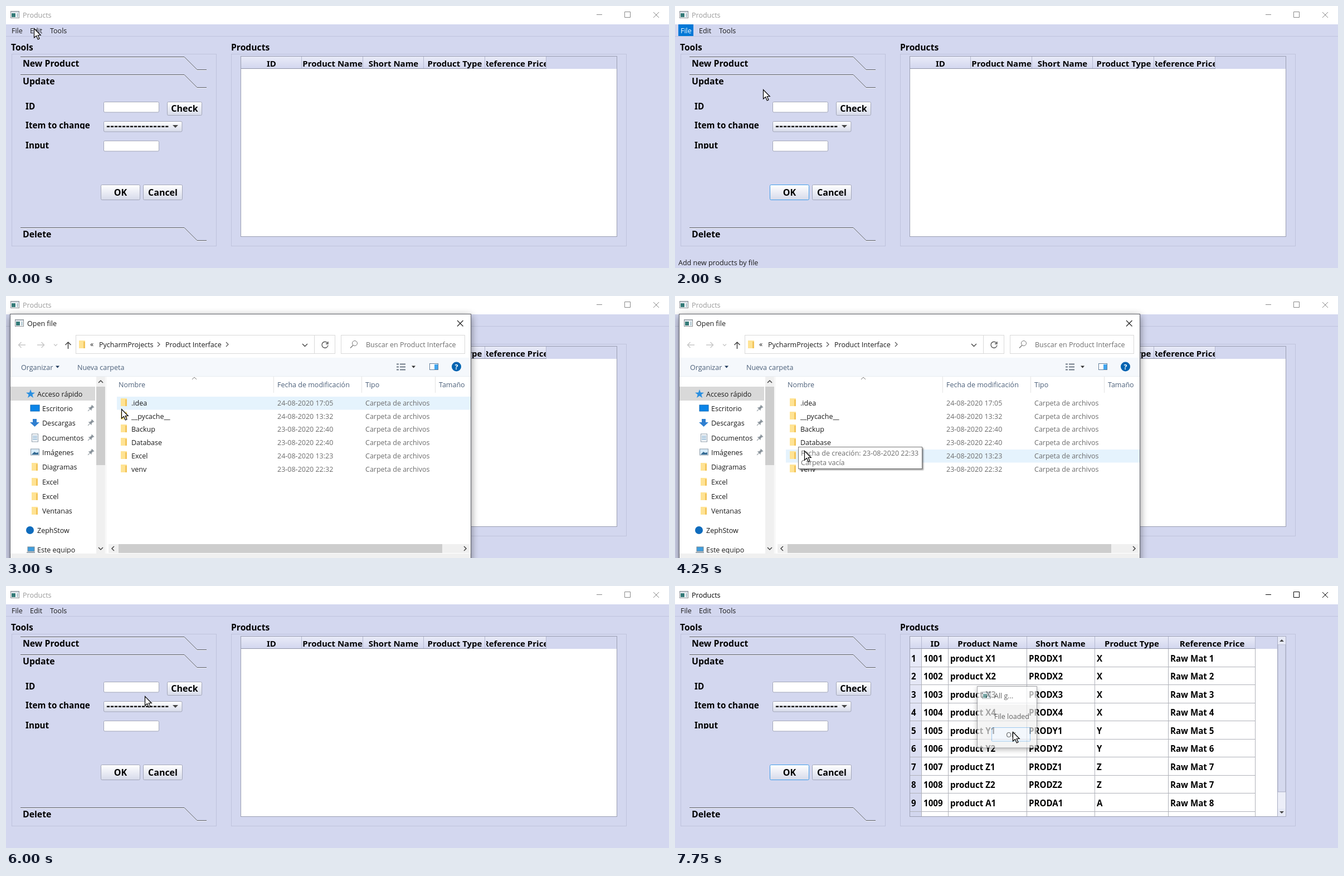
Recreate the animation shown at these times as an HTML page. Size 1190 by 471 pixels, loop 8000 ms.

```html
<!DOCTYPE html>
<html lang="en">
<head>
<meta charset="utf-8">
<title>Products</title>
<style>
html, body { margin: 0; width: 100%; height: 100%; overflow: hidden; background: #d3d7ef; }
svg { display: block; }
text { font: 12.5px "Open Sans", sans-serif; fill: #1a1a1a; white-space: pre; }
.b { font-family: "Noto Sans", sans-serif; font-weight: 700; fill: #000; }
.dash { font: 700 16.9px "DejaVu Sans", sans-serif; }
.mid { text-anchor: middle; }
.grey { fill: #6d6d6d; }
.head { fill: #4c607a; }
.line { fill: none; stroke: #444; }
.title text { fill: #999; }
.title path { fill: none; stroke: #888; }
.title.on text { fill: #000; }
.title.on path { stroke: #000; }
#okButton.on { stroke: #3f9be8; }
#fileMenu.on rect { fill: #0078d7; }
#fileMenu.on text { fill: #fff; }
#dialog { filter: drop-shadow(0 4px 7px #0007); }
#message { filter: drop-shadow(0 3px 5px #0006); }
#tip rect { filter: drop-shadow(2px 2px 1px #0006); }
</style>
</head>
<body>
<svg id="stage" width="1190" height="471" viewBox="0 0 1190 471"></svg>
<script>
const rect = (x, y, w, h, fill, stroke = 'none', more = '') =>
  `<rect x="${x}" y="${y}" width="${w}" height="${h}" fill="${fill}" stroke="${stroke}" ${more}/>`;
const text = (x, y, s, cls = '', size = 12.5) =>
  `<text x="${x}" y="${y}" class="${cls}" style="font-size:${size}px">${s}</text>`;
const bold = (x, y, s, size = 15.2, cls = '') => text(x, y, s, 'b ' + cls, size);
const line = (d, stroke = '#444', width = 1) =>
  `<path class="line" d="${d}" style="stroke:${stroke};stroke-width:${width}"/>`;
const shape = (d, fill) => `<path d="${d}" fill="${fill}"/>`;
const group = (id, body, more = '') => `<g id="${id}" ${more}>${body}</g>`;
const each = (list, f) => list.map(f).join('');

const appIcon = (x, y) => rect(x + .5, y + .5, 15, 12, '#fff', '#8a8f94')
  + rect(x + 1, y + 1, 14, 2, '#c9d3dc') + rect(x + 2, y + 4, 7, 7, '#347a78')
  + rect(x + 11, y + 4, 3, 7, '#b9cdd6');
const folder = (x, y) => rect(x, y, 11, 14, '#ffe394') + rect(x + 8, y + 2, 3, 12, '#f2c55c');
const button = (x, y, w, h, label, id = '') =>
  rect(x + .5, y + .5, w, h, 'url(#face)', '#a2a6b8', `rx="2" id="${id}"`)
  + bold(x + w / 2 + .5, y + h / 2 + 6, label, 16, 'mid');
const input = y => rect(175.5, y + .5, 99, 18.5, '#fff', '#a2a6b8', 'rx="2"');
const tab = (y, label) => line(`M26 ${y + 1.5}H320L343 ${y + 24.5}H360`, '#f4f5fc')
  + line(`M26 ${y + .5}H320L343 ${y + 23.5}H360`, '#55585f') + bold(30, y + 17.5, label, 15.8);

const defs = `<defs>
<linearGradient id="face" x2="0" y2="1"><stop stop-color="#fff"/><stop offset="1" stop-color="#d6daea"/></linearGradient>
<linearGradient id="hdr" x2="0" y2="1"><stop stop-color="#e9ebf8"/><stop offset="1" stop-color="#d2d6ee"/></linearGradient>
<clipPath id="priceClip"><rect x="862" y="90" width="107" height="24"/></clipPath>
<clipPath id="rowClip"><rect x="422" y="91" width="674" height="323"/></clipPath>
<clipPath id="sideClip"><rect x="8" y="145" width="154" height="318"/></clipPath>
</defs>`;

function mainWindow() {
  const title = rect(0, 0, 1190, 33, '#fff') + appIcon(8, 9) + text(30, 21, 'Products')
    + '<path d="M1060 15.5h10M1110.5 10.5h10v10h-10zM1162 11l10 10M1172 11l-10 10"/>';
  return group('title', title, 'class="title"')
    + line('M0 54.5H1190', '#bfc4de')
    + group('fileMenu', rect(6, 33, 27, 21, 'none') + text(10, 48.5, 'File'))
    + text(43, 48.5, 'Edit') + text(79, 48.5, 'Tools')
    + bold(9, 80, 'Tools', 15.6) + bold(404, 80, 'Products', 15.7)
    + rect(10.5, 86.5, 367, 345, 'none', '#bfc3dc') + rect(404.5, 86.5, 709, 345, 'none', '#bfc3dc')
    + tab(91, 'New Product') + tab(123, 'Update') + tab(398, 'Delete')
    + bold(35, 186, 'ID') + bold(35, 220, 'Item to change') + bold(35, 255.5, 'Input')
    + rect(34, 221, 125, 6, '#d3d7ef') + rect(34, 256.5, 125, 6, '#d3d7ef')
    + input(172) + input(242) + rect(175.5, 207.5, 140.5, 18.5, 'url(#face)', '#a2a6b8', 'rx="2"')
    + text(180, 222, '-'.repeat(16), 'dash', 16.9) + shape('M299 214h10l-5 5z', '#444')
    + button(289, 172, 62, 24, 'Check') + button(170, 321, 70, 27, 'OK', 'okButton')
    + button(246, 321, 70, 27, 'Cancel')
    + text(6, 465.5, 'Add new products by file', 'status');
}

const heads = ['ID', 'Product Name', 'Short Name', 'Product Type', 'Reference Price'];

function headerCells(edges, centers, clipLast) {
  const last = edges[edges.length - 1];
  return rect(421.5, 90.5, 675, 324, '#fff', '#9a9eb2') + rect(422, 91, 674, 22, '#d3d7ef')
    + rect(422, 91, last - 422, 22, 'url(#hdr)') + line(`M422 112.5H${last}`, '#8f93a8')
    + each(edges, x => line(`M${x - .5} 91V112`, '#b4b8d0'))
    + each(heads, (h, i) => `<g ${clipLast && i == 4 ? 'clip-path="url(#priceClip)"' : ''}>`
      + bold(centers[i], 108.5, h, 15, 'mid') + '</g>');
}

function fullTable() {
  const edges = [443, 491, 632, 754, 886, 1042], pitch = 32.45;
  const codes = ['X1', 'X2', 'X3', 'X4', 'Y1', 'Y2', 'Z1', 'Z2', 'A1'];
  const rows = each(codes, (c, i) => {
    const y = 113 + pitch * i, base = Math.round(y + 23);
    const cells = [i + 1, 1001 + i, 'product ' + c, 'PROD' + c, c[0], 'Raw Mat ' + (i < 7 ? i + 1 : i)];
    return line(`M422 ${Math.floor(y + pitch) + .5}H1042`, '#b0b2ba')
      + each(cells, (s, k) => bold([424, 446, 494, 635, 757, 889][k], base, s, 15.1));
  });
  return headerCells(edges, [467, 561, 692, 820, 964], false)
    + '<g clip-path="url(#rowClip)">' + rect(422, 113, 21, 301, 'url(#hdr)')
    + each(edges, x => line(`M${x - .5} 113V414`, '#b0b2ba')) + rows + '</g>'
    + rect(1081.5, 90.5, 15, 324, '#eceef8', '#a8acc2') + rect(1082, 105, 14, 265, '#d5d9ee', '#a8acc2')
    + rect(1082, 91, 14, 14, '#e6e9f6') + rect(1082, 400, 14, 14, '#e6e9f6')
    + shape('M1085 100h8l-4-4zM1085 405h8l-4 4z', '#444');
}

function sidebar() {
  const subs = ['Escritorio', 'Descargas', 'Documentos', 'Imágenes', 'Diagramas', 'Excel', 'Excel', 'Ventanas'];
  const icons = [
    y => rect(44, y - 6, 16, 11, '#0a84e8', '#0868b8'),
    y => shape(`M48 ${y - 7}h7v6h5l-8.500 8l-8.500-8h5z`, '#2f7fd0'),
    y => rect(46.5, y - 7, 11, 14, '#fff', '#8a9aa8') + line(`M48 ${y - 3}h8m-8 3h8m-8 3h8`, '#4a87b8'),
    y => rect(44.5, y - 6, 15, 11, '#d8ecfa', '#8a9aa8') + shape(`M46 ${y + 4}l5-5 3 2 4-1v4z`, '#356b94')];
  const pin = y => `<g transform="translate(152 ${y}) rotate(45)">`
    + shape('M-3-6h6v1.500h-1v4l2 2.500h-8l2-2.500v-4h-1z', '#8b949c') + line('M0 2v5', '#8b949c') + '</g>';
  return rect(8, 163, 152, 25, '#d9d9d9')
    + shape('M44 168l2 5.500 6 .2-4.700 3.600 1.700 5.700-5-3.400-5 3.400 1.700-5.700-4.700-3.600 6-.2z', '#2a8fe0')
    + text(56, 180.5, 'Acceso rápido')
    + each(subs, (s, i) => {
      const y = Math.round(202 + 26.35 * i);
      return (i < 4 ? icons[i](y) + pin(y) : folder(46, y - 7)) + text(65, y + 4.5, s);
    })
    + '<circle cx="43" cy="421" r="7" fill="#0f6cbd"/>' + text(56, 426, 'ZephStow')
    + rect(39, 451, 12, 8, '#3f9ede', '#7c8790') + rect(37, 460, 15, 2, '#9aa5ae') + text(56, 460.5, 'Este equipo');
}

function fileRow(i, name, date, type) {
  const y = 197 + Math.round(23.7 * i);
  return text(225, y, name) + text(487, y, date, 'grey') + text(645, y, type, 'grey');
}

function nav(color) {
  return line('M35 88H22.500m5-5l-5 5 5 5', color, 1.5) + line('M86 86.500l3 3 3-3', color, 1.3);
}

function dialog() {
  const folders = [['.idea', '24-08-2020 17:05'], ['__pycache__', '24-08-2020 13:32'], ['Backup', '23-08-2020 22:40'],
    ['Database', '23-08-2020 22:40'], ['Excel', '24-08-2020 13:23'], ['venv', '23-08-2020 22:32']];
  const root = nav('#c8c8c8') + text(646, 92, 'Buscar en Product Interface', 'grey')
    + each(folders, ([n, d], i) => folder(206, 184 + Math.round(23.7 * i)) + fileRow(i, n, d, 'Carpeta de archivos'));
  const sub = nav('#444') + text(646, 92, 'Buscar en Excel', 'grey') + text(409, 92, 'Excel')
    + rect(204, 184, 14, 15, '#1d7244') + fileRow(0, 'prod.xlsx', '24-08-2020 13:23', 'Hoja de cálculo d...')
    + text(816, 197, '11', 'grey');
  const tip = rect(221.5, 271.5, 222, 39, '#fff', '#767676')
    + text(226, 287, 'Fecha de creación: 23-08-2020 22:33', 'grey') + text(226, 304, 'Carpeta vacía', 'grey');
  return rect(7.5, 32.5, 827, 450, '#fff', '#5d5f68') + rect(8, 111, 826, 33, '#f5f8fc') + line('M8 144.500H834', '#e8ecf1')
    + appIcon(16, 42) + text(38, 54, 'Open file') + line('M810 44l10.500 10.500M820.500 44L810 54.500', '#222', 1.2)
    + rect(125.5, 70.5, 465, 33, '#fff', '#d9d9d9') + line('M553.500 71V103', '#d9d9d9')
    + rect(601.5, 70.5, 222, 33, '#fff', '#d9d9d9')
    + line('M56 88H68.500m-5-5l5 5-5 5', '#c8c8c8', 1.5) + line('M111.500 95V83m-5 5l5-5 5 5', '#444', 1.5)
    + folder(131, 80) + text(151, 91, '«') + text(167, 92, 'PycharmProjects') + text(286, 92, 'Product Interface')
    + line('M272 83l4 4-4 4M395 83l4 4-4 4', '#555', 1.2) + line('M532 86l4.500 4.500 4.500-4.500', '#444', 1.4)
    + line('M577 84.500a5.500 5.500 0 1 0 1 4M578 82v4h-4', '#555', 1.4)
    + '<circle cx="626" cy="85" r="4.500" class="line" style="stroke:#777"/>' + line('M623 88.500l-5 5', '#777', 1.3)
    + text(27, 132.5, 'Organizar', 'head') + shape('M89 125.500h7l-3.500 4z', '#1e395b') + text(128, 132.5, 'Nueva carpeta', 'head')
    + line('M701 122.500h4m2 0h10m-16 5h4m2 0h10m-16 5h4m2 0h10', '#6e7985', 2) + shape('M728 125.500h7l-3.500 4z', '#333')
    + rect(760.5, 121.5, 15, 11, '#fff', '#607d9a') + rect(769, 123, 6, 9, '#41a5ee')
    + '<circle cx="808.500" cy="127" r="8.500" fill="#0063b1"/><text x="808.500" y="131.500" class="mid" style="fill:#fff;font-weight:700">?</text>'
    + '<g clip-path="url(#sideClip)">' + sidebar() + '</g>'
    + rect(162, 145, 16, 318, '#f0f0f0') + rect(162, 163, 16, 141, '#cdcdcd')
    + line('M166 156l4-4 4 4M166 452l4 4 4-4', '#444', 1.5) + line('M179.500 145V463', '#f0f0f0')
    + text(202, 164, 'Nombre', 'head') + text(487, 164, 'Fecha de modificación', 'head')
    + text(645, 164, 'Tipo', 'head') + text(777, 164, 'Tamaño', 'head')
    + line('M334 150l4-4 4 4', '#777') + line('M480.500 145V174M638.500 145V174M770.500 145V174', '#e3e3e3')
    + rect(199, 181, 635, 23.5, '#e5f3fd', 'none', 'id="hover"')
    + group('root', root) + group('sub', sub) + group('tip', tip)
    + rect(184, 446, 649, 16, '#f0f0f0') + rect(202, 446, 581, 16, '#cdcdcd')
    + line('M194 450l-4 4 4 4M822 450l4 4-4 4', '#444', 1.5) + rect(8, 463, 826, 8, '#f0f0f0');
}

function message() {
  return rect(542.5, 180.5, 107, 110.5, '#f0f0f0', '#77797f') + rect(543, 181, 106, 32, '#fff')
    + appIcon(551, 190) + text(573, 202, 'All g...')
    + group('messageX', line('M625.500 192l10.500 10.500M636 192l-10.500 10.500', '#222', 1.2))
    + text(573, 238.5, 'File loaded') + rect(568.5, 254.5, 69, 24.5, '#eef4fb', '#6fb1e8', 'rx="1"')
    + text(603, 272, 'OK', 'mid');
}

const arrow = '<path d="M.5 .5V17l4-3.500 2.800 6.500 2.700-1.200-2.800-6.300h5z" fill="#fff" stroke="#000" stroke-width="1.200"/>';
const el = id => document.getElementById(id);
el('stage').innerHTML = defs + mainWindow()
  + group('empty', headerCells([531, 641, 750, 860, 970], [476.5, 586, 695.5, 805.5, 915], true))
  + group('full', fullTable()) + group('dialog', dialog()) + group('message', message()) + group('cursor', arrow);
const status = document.querySelector('.status');

// time, x, y of the pointer tip
const path = [[0, 50, 40], [250, 37, 35], [500, 20, 42], [1000, 20, 42], [1250, 28, 60], [2000, 158, 150],
  [2250, 158, 150], [3000, 207, 203], [3250, 220, 234], [3750, 230, 277], [4250, 232, 278], [4750, 232, 278],
  [5250, 250, 244], [5750, 249, 198], [6250, 249, 198], [7000, 598, 260], [7250, 606, 262], [8000, 606, 262]];

function pointer(t) {
  const i = path.findIndex(p => p[0] > t);
  const [a, b] = [path[i - 1], path[i]], k = (t - a[0]) / (b[0] - a[0]);
  return [a[1] + (b[1] - a[1]) * k, a[2] + (b[2] - a[2]) * k].map(Math.round);
}

const show = (node, on) => { node.style.display = on ? '' : 'none'; };
const mark = (id, on) => el(id).classList.toggle('on', on);

function draw(t) {
  const within = (a, b) => t >= a && t < b;
  const [x, y] = pointer(t), done = t >= 7750, inSub = t >= 4750;
  el('cursor').setAttribute('transform', `translate(${x} ${y})`);
  mark('title', within(1000, 2000) || done);
  mark('fileMenu', within(1000, 2250));
  mark('okButton', within(1000, 2250) || done);
  show(status, within(1500, 2250));
  show(el('dialog'), within(2250, 6000));
  show(el('root'), !inSub);
  show(el('sub'), inSub);
  show(el('tip'), within(4250, 4500));
  const row = Math.floor((y - 181) / 23.7);
  show(el('hover'), x > 199 && row >= 0 && row < (inSub ? 1 : 6));
  el('hover').setAttribute('y', 181 + Math.round(23.7 * row));
  el('hover').setAttribute('fill', within(4500, 4750) ? '#cce8ff' : '#e5f3fd');
  show(el('empty'), !done);
  show(el('full'), done);
  show(el('message'), t >= 6250);
  show(el('messageX'), !done);
  el('message').style.opacity = done ? .68 : t < 6500 ? .75 : 1;
}

const start = performance.now();
function tick() {
  const t = (performance.now() - start) % 8000;
  draw(Math.floor(t / 250) * 250);
  requestAnimationFrame(tick);
}
tick();
</script>
</body>
</html>
```
